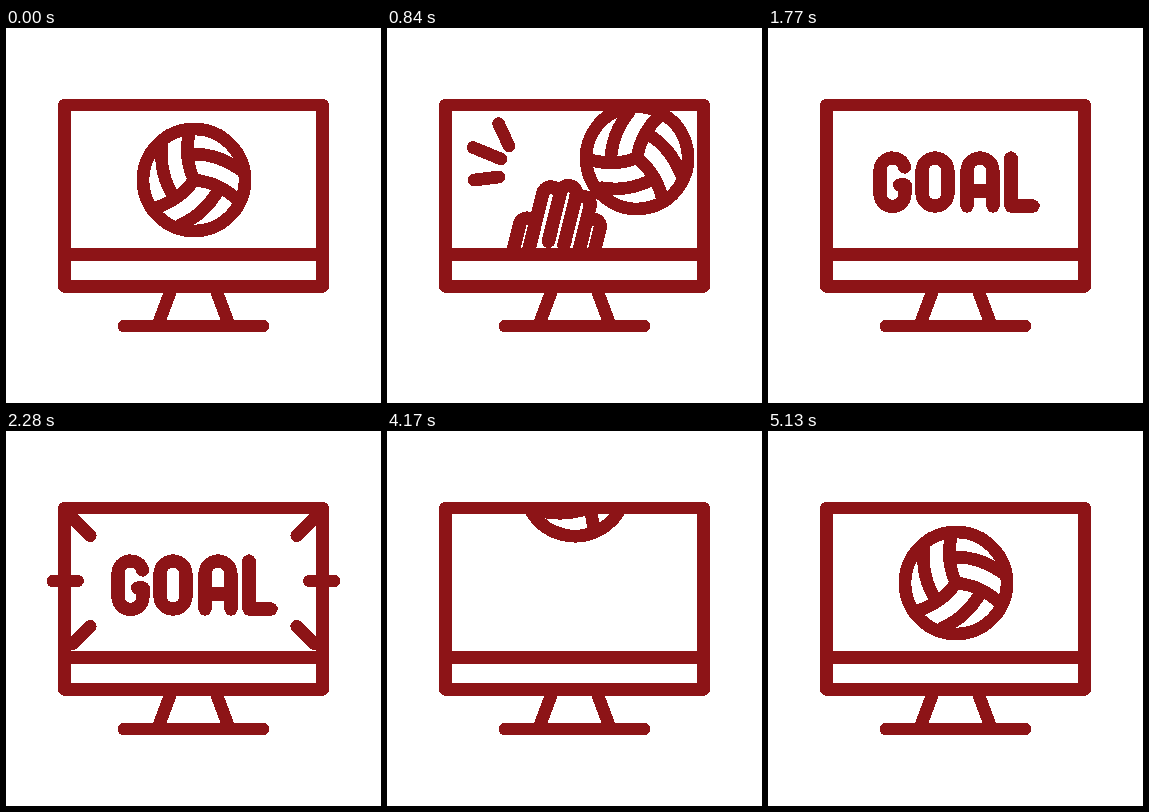
Animation of 375 by 375 pixels, one loop 5.4 s. Source, as an HTML page with a canvas:

```html
<!DOCTYPE html>
<html lang="en">
<head>
<meta charset="utf-8">
<title>Volleyball broadcast</title>
<style>
  html, body { margin: 0; width: 100%; height: 100%; overflow: hidden; background: #fff; }
  canvas { display: block; width: 100vmin; height: 100vmin; }
</style>
</head>
<body>
<canvas id="stage" width="375" height="375"></canvas>
<script>
const ctx = document.getElementById('stage').getContext('2d', { willReadFrequently: true });
const LOOP = 5400, STEP = 30, SIZE = 375, MID = 187.5;
const INK = '#8d1417';
const EDGE_CUTOFF = 38;
const RAD = Math.PI / 180;

const clamp = v => Math.min(1, Math.max(0, v));
const span = (t, from, to) => clamp((t - from) / (to - from));
const mix = (a, b, u) => a + (b - a) * u;
const smooth = u => u * u * (3 - 2 * u);
const sineOut = u => Math.sin(u * Math.PI / 2);
const easeOut = (u, power) => 1 - (1 - u) ** power;

function line(x1, y1, x2, y2) {
  ctx.beginPath();
  ctx.moveTo(x1, y1);
  ctx.lineTo(x2, y2);
  ctx.stroke();
}

function placed(x, y, degrees, draw) {
  ctx.save();
  ctx.translate(x, y);
  ctx.rotate(degrees * RAD);
  draw();
  ctx.restore();
}

function monitor() {
  ctx.lineWidth = 12.2;
  ctx.strokeRect(58.5, 77, 258, 181.5);
  line(64, 226.5, 311, 226.5);
  ctx.lineWidth = 12;
  line(118, 298, 257, 298);
  line(165, 262, 153, 294);
  line(210, 262, 222, 294);
}

function ball(x, y, degrees) {
  ctx.lineWidth = 12;
  placed(x, y, degrees, () => {
    ctx.beginPath();
    ctx.arc(0, 0, 51, 0, 2 * Math.PI);
    ctx.stroke();
    for (let i = 0; i < 3; i++) {
      ctx.rotate(120 * RAD);
      ctx.beginPath();
      ctx.moveTo(0, 0);
      ctx.quadraticCurveTo(-11, -24, -4, -50);
      ctx.moveTo(-5, -26);
      ctx.quadraticCurveTo(23, -27, 45, -11);
      ctx.stroke();
    }
  });
}

// Hand outline in its upright frame, wrist at the origin.
const hand = new Path2D(
  'M-35 0V-40a7.5 7.5 0 0 1 15 0' +
  'M-20 0V-75a8.5 8.5 0 0 1 17 0V-30' +
  'M-3 -78V-81a8 8 0 0 1 16 0V-30' +
  'M13 -74a8 8 0 0 1 16 0V0' +
  'M29 -55a7.5 7.5 0 0 1 15 0V0');

// time, dx, dy, turn
const handKeys = [
  [120, -30, 95, -20],
  [480, -50, -15, -22],
  [660, -45, -50, -10],
  [1069, 65, 72, 14]
];

function drawHand(t) {
  const i = handKeys.findIndex(key => t < key[0]);
  if (i < 1) return;
  const [a, b] = [handKeys[i - 1], handKeys[i]];
  const u = smooth(span(t, a[0], b[0]));
  const [dx, dy, turn] = [1, 2, 3].map(k => mix(a[k], b[k], u));
  ctx.lineWidth = 12.8;
  placed(157 + dx, 243 + dy, 14 + turn, () => ctx.stroke(hand));
}

function impact(t) {
  const tip = easeOut(span(t, 670, 850), 2);
  const tail = span(t, 840, 1020) ** 2;
  if (tip <= tail) return;
  ctx.lineWidth = 12;
  const spark = (x1, y1, x2, y2) =>
    line(mix(x1, x2, tail), mix(y1, y2, tail), mix(x1, x2, tip), mix(y1, y2, tip));
  spark(122, 118, 111.5, 95.5);
  spark(114, 131, 86, 119.5);
  spark(112, 149, 87, 152);
}

// Lettering keeps its stroke weight while it grows.
function goal(t) {
  const u = easeOut(span(t, 1290, 1770), 4);
  const scale = mix(0.2, 1, u);
  const at = new DOMMatrix([scale, 0, 0, scale, 188.5, mix(250, 154, u)]);
  const word = new Path2D();
  word.addPath(new Path2D(
    'M-52 -15a12.5 12.5 0 0 0 -24.5 3V12a12.5 12.5 0 0 0 25 0V3H-57' +
    'M-34.5 -11a13 13 0 0 1 26 0V11a13 13 0 0 1 -26 0Z' +
    'M10.5 24V-11a13 13 0 0 1 26 0V24M10.5 9H36.5' +
    'M54.5 -24V24H76.5'), at);
  ctx.lineWidth = 12.6;
  ctx.stroke(word);
}

function rays(t) {
  if (t < 1810 || t >= 3930) return;
  const phase = (t - 1810) % 530;
  const reach = 44;
  const outer = reach * (1 - easeOut(span(phase, 0, 110), 3));
  const inner = reach * (1 - (phase / 538) ** 6);
  if (inner <= outer) return;
  ctx.lineWidth = 12;
  for (const side of [-1, 1]) {
    const ray = (x, y, angle) => {
      const c = Math.cos(angle * RAD), s = Math.sin(angle * RAD);
      const px = d => MID + side * (MID - x - d * c);
      line(px(outer), y + outer * s, px(inner), y + inner * s);
    };
    ray(47, 150, 0);
    ray(67, 87.5, 45);
    ray(67, 212.5, -45);
  }
}

function fallingBall(t) {
  const y = t < 4440
    ? mix(4, 163.5, sineOut(span(t, 4095, 4440) * 0.93) / sineOut(0.93))
    : mix(163.5, 152, sineOut(span(t, 4440, 5130)));
  ball(188, y, -90 * (1 - span(t, 4095, 5130)) ** 2);
}

function screen(t) {
  ctx.save();
  ctx.beginPath();
  ctx.rect(62, 80, 251, 143);
  ctx.clip();
  drawHand(t);
  impact(t);
  if (t < 1200) {
    const flight = Math.max(0, t - 648);
    ball(188 + flight * 0.323, 152 - flight * 0.115, flight * 0.175);
  } else if (t >= 1320 && t < 4110) {
    goal(t);
  } else if (t >= 4110) {
    fallingBall(t);
  }
  ctx.restore();
}

// Every touched pixel becomes solid, which gives the hard stepped edges.
function hardenEdges() {
  const image = ctx.getImageData(0, 0, SIZE, SIZE);
  const pixels = new Uint32Array(image.data.buffer);
  const [r, g, b] = [1, 3, 5].map(i => parseInt(INK.slice(i, i + 2), 16));
  const solid = (255 << 24 | b << 16 | g << 8 | r) >>> 0;
  for (let i = 0; i < pixels.length; i++) {
    pixels[i] = pixels[i] >>> 24 > EDGE_CUTOFF ? solid : 0;
  }
  ctx.putImageData(image, 0, 0);
}

function render(t) {
  ctx.clearRect(0, 0, SIZE, SIZE);
  ctx.strokeStyle = INK;
  ctx.lineCap = ctx.lineJoin = 'round';
  screen(t);
  monitor();
  rays(t);
  hardenEdges();
}

const start = performance.now();
function tick() {
  const t = (performance.now() - start) % LOOP;
  render(Math.floor(t / STEP) * STEP);
  requestAnimationFrame(tick);
}
tick();
</script>
</body>
</html>
```
